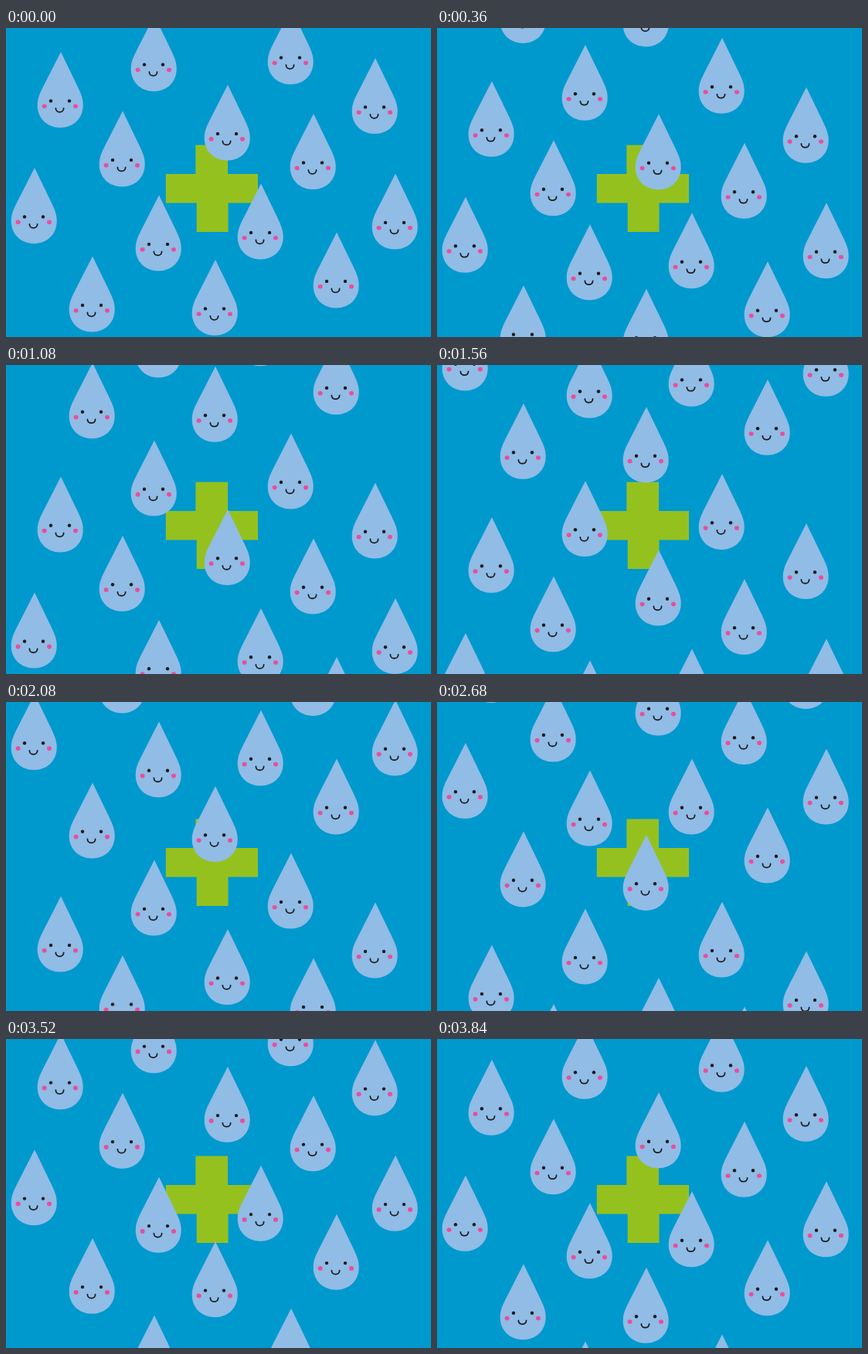
An HTML page for the animation above (3880 ms loop, 550x400 px).

```html
<!DOCTYPE html>
<html lang="en">
<head>
<meta charset="utf-8">
<title>Happy rain</title>
<style>
  html, body { margin: 0; height: 100%; overflow: hidden; background: #0099ce; }
  svg { display: block; width: 550px; height: 400px; }
</style>
</head>
<body>
<svg viewBox="0 0 550 400">
  <defs>
    <g id="drop">
      <path fill="#90bce6" d="M0 0L22 45.5C26.5 55 28.7 61 28.7 69C28.7 86 16 98 -.8 98S-30.3 86 -30.3 69C-30.3 61 -28 55 -23.2 45.5Z"/>
      <g fill="#e94e9b">
        <ellipse cx="-21.4" cy="70.2" rx="3" ry="2.8"/>
        <ellipse cx="19" cy="70.2" rx="3" ry="2.8"/>
      </g>
      <g fill="#1d1d1b">
        <circle cx="-13" cy="63.4" r="2.2"/>
        <circle cx="11" cy="63.4" r="2.2"/>
      </g>
      <path fill="none" stroke="#1d1d1b" stroke-width="1.8" stroke-linecap="round" d="M-6.6 73C-6.6 79.5 3.6 79.5 3.6 73"/>
    </g>
    <g id="cloudburst"></g>
  </defs>
  <path fill="#95c11f" d="M245.4 151.6H287V189H326V226.5H287.5V264H246.7V226.5H206.8V189H245.4Z"/>
  <g id="rain">
    <use href="#cloudburst"/>
    <use href="#cloudburst" id="next"/>
  </g>
</svg>
<script>
const STEP = 40, STEPS = 97, SPEED = 4.2, HOP_EVERY = 36;
const byId = id => document.getElementById(id);

// Steady fall with a half-step hop at regular intervals
const fallen = step => SPEED * (step + Math.floor(step / HOP_EVERY) / 2);

// Tip of each drop when the loop starts
const tips = [
  [369, -25], [192, -16], [71, 31], [478, 39], [287, 73.5], [151, 107.5], [398, 111],
  [37, 181], [504, 188.5], [330, 201.5], [198, 216.5], [428, 264.5], [112, 295.5], [271, 300]
];
byId('cloudburst').innerHTML = tips.map(([x, y]) => `<use href="#drop" x="${x}" y="${y}"/>`).join('');
byId('next').setAttribute('y', -fallen(STEPS));

function draw() {
  const step = Math.floor(performance.now() / STEP) % STEPS;
  byId('rain').setAttribute('transform', `translate(0 ${fallen(step)})`);
  requestAnimationFrame(draw);
}
draw();
</script>
</body>
</html>
```
